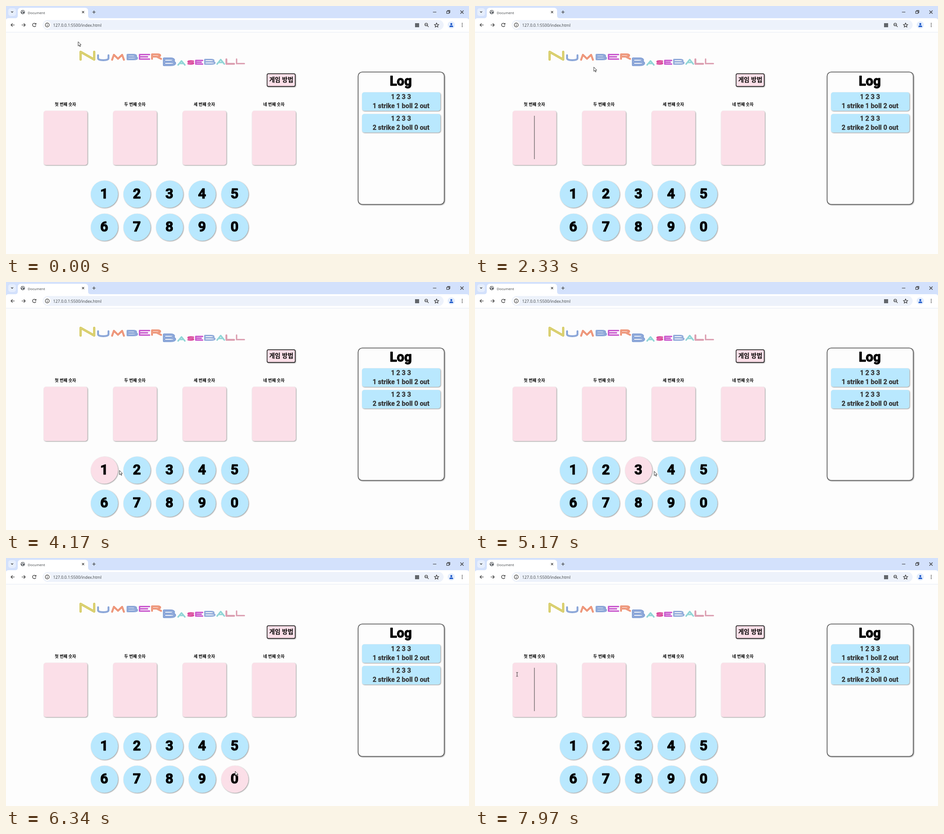
Recreate the animation shown at these times as an HTML page. Size 1021 by 549 pixels, loop 8000 ms.

```html
<!DOCTYPE html>
<html lang="ko">
<head>
<meta charset="utf-8">
<title>Document</title>
<style>
html, body { margin: 0; width: 100%; height: 100%; overflow: hidden; background: #fdfdfd; }
svg { display: block; width: 100vw; height: 100vh; }
text { font-family: Roboto, "Noto Sans CJK KR", sans-serif; text-anchor: middle; }
.ui { font-family: "Open Sans", "Noto Sans", sans-serif; text-anchor: start; fill: #3c4043; }
.round { stroke-linejoin: round; stroke: currentColor; fill: currentColor; }
.ko { font-family: "Noto Sans CJK KR", "Noto Sans CJK", sans-serif; font-weight: 900; }
.line { fill: none; stroke: #333; stroke-width: 1.2; }
.shade { filter: drop-shadow(1.5px 1.5px 1.2px rgba(0, 0, 0, .42)); }
.letter path { fill: none; stroke-linejoin: round; stroke-linecap: round; vector-effect: non-scaling-stroke; }
</style>
</head>
<body>
<svg id="stage" viewBox="0 0 1021 549" preserveAspectRatio="none">
  <!-- browser window -->
  <rect width="1021" height="30" fill="#d3e1fc"/>
  <rect x="5" y="5" width="17" height="17" rx="5" fill="#e6eefd"/>
  <path d="M20 27Q26 27 26 21V11Q26 4 33 4H174Q181 4 181 11V21Q181 27 187 27Z" fill="#fff"/>
  <path d="M0 32Q0 27 6 27H1015Q1021 27 1021 32V58H0Z" fill="#fff"/>
  <path d="M0 58H1021" stroke="#e3e9f3"/>
  <rect x="81" y="31" width="884" height="22" rx="11" fill="#edf2fb"/>
  <circle cx="91" cy="42" r="8" fill="#fff"/>
  <circle cx="37" cy="13.5" r="4.7" fill="#5f6368"/>
  <path d="M33.5 12Q36 12 36 14T38 17M36.5 9.5Q37 12 40.5 12" fill="none" stroke="#fff" stroke-width="1.3"/>
  <text class="ui" x="48" y="17.5" font-size="7.8">Document</text>
  <text class="ui" x="104" y="45.5" font-size="8.8">127.0.0.1:5500/index.html</text>
  <g class="line">
    <path d="M11.3 12L13.5 14.2L15.7 12M167.7 11.2L172.3 15.8M172.3 11.2L167.7 15.8M190.5 13.5H197.500M194 10V17"/>
    <path d="M941.500 13.500H949M972 11.500H977V16.500H972ZM974 11V9.800H978.800V14.700H977.500M1002 10L1009 17M1009 10L1002 17"/>
    <path d="M19 42H11M14.500 38.500L11 42L14.500 45.500M34.500 42H42.500M39 38.500L42.500 42L39 45.500"/>
    <path d="M65.300 39.500A3.800 3.800 0 1 0 66 43M66.300 37.800V40.500H63.300"/>
    <circle cx="91" cy="42" r="4.300"/><path d="M91 41.500V44.500M91 39.400V40.500"/>
    <circle cx="926.700" cy="41" r="3"/><path d="M929 43.300L932 46.300M925.200 41H928.200"/>
    <path d="M949.500 37.700L950.900 40.800L954.200 41.100L951.700 43.300L952.500 46.600L949.500 44.900L946.500 46.600L947.300 43.300L944.800 41.100L948.100 40.800Z"/>
  </g>
  <rect x="902" y="38" width="9" height="9" fill="#62666b"/>
  <circle cx="982" cy="42" r="8" fill="#e3edfd"/>
  <path d="M978 46.500V45Q978 43 982 43T986 45V46.500Z" fill="#1a57c8"/>
  <circle cx="982" cy="40" r="2.200" fill="#1a57c8"/>
  <g fill="#333"><circle cx="1006" cy="38.500" r="1"/><circle cx="1006" cy="42" r="1"/><circle cx="1006" cy="45.500" r="1"/></g>

  <!-- page -->
  <g id="title"></g>
  <rect class="shade" x="575.700" y="150" width="62" height="28" rx="3" fill="#fbdfe8" stroke="#111" stroke-width="1.400"/>
  <text class="ko" x="607" y="168" font-size="13.400">게임 방법</text>
  <rect class="shade" x="776.500" y="146.300" width="190" height="293" rx="9" fill="#fdfdfd" stroke="#555" stroke-width="1.600"/>
  <text class="round" x="870.500" y="175.500" font-size="29" font-weight="700" stroke-width="1.300">Log</text>
  <g id="page"></g>
  <path id="caret" d="M131 243V339" stroke="#3a3a3a"/>
  <path id="arrow" d="M0 0V9.500L2.200 7.500L3.800 11L5.200 10.400L3.700 7H6.600Z" fill="#fff" stroke="#222" stroke-width=".9"/>
  <path id="beam" d="M-2 -4.500Q0 -4.500 0 -3.500Q0 -4.500 2 -4.500M0 -3.500V3.500M-2 4.500Q0 4.500 0 3.500Q0 4.500 2 4.500" fill="none" stroke="#333"/>
</svg>
<script>
const LOOP = 8000, BLUE = '#b9e8fe', PINK = '#fbdfe8';
const $ = id => document.getElementById(id);

function add(parent, tag, attrs, text = '') {
  const el = document.createElementNS('http://www.w3.org/2000/svg', tag);
  for (const key in attrs) el.setAttribute(key, attrs[key]);
  el.textContent = text;
  return parent.appendChild(el);
}

// Title lettering: each glyph is drawn in a 10 by 10 box.
const glyphs = {
  N: 'M0 10V0L10 10V0',
  U: 'M0 0V6Q0 10 5 10T10 6V0',
  M: 'M0 10L1.5 0L5 8L8.5 0L10 10',
  B: 'M0 0V10H6Q10 10 10 7.4T5 5H0M0 0H6Q9 0 9 2.5T5 5',
  E: 'M10 0H0V10H10M0 5H8',
  R: 'M0 10V0H6Q9 0 9 2.5T5 5H0M5 5L10 10',
  A: 'M0 10L5 0L10 10M2 6.5H8',
  S: 'M10 1Q8 0 5 0Q0 0 0 2.5T5 5T10 7.5T5 10Q2 10 0 9',
  L: 'M0 0V10H10'
};
const yellow = '#d6cb62', blue = '#7f9dd4', orange = '#ec8b6c', purple = '#c13fc6',
      teal = '#7fcfd0', rose = '#d6338f', dusty = '#d894a8';
const letters = [
  ['N', 162, 99, 35, 22, yellow], ['U', 201, 107, 27, 15, blue], ['M', 232, 106, 30, 15, orange],
  ['B', 266, 106, 25, 14, blue], ['E', 293, 106, 25, 13, purple], ['R', 320, 105, 24, 14, orange],
  ['B', 346, 114, 29, 19, blue], ['A', 378, 120, 18, 12, teal], ['S', 400, 120, 15, 10, rose],
  ['E', 417, 119, 18, 11, purple], ['B', 437, 117, 25, 13, blue], ['A', 464, 117, 19, 13, teal],
  ['L', 484, 116, 21, 14, dusty], ['L', 507, 116, 20, 13, dusty]
];
for (const [char, x, y, w, h, color] of letters) {
  const pen = h > 18 ? 5 : h > 13 ? 4 : 3;
  const g = add($('title'), 'g', {
    class: 'letter',
    transform: `translate(${x + pen / 2} ${y + pen / 2}) scale(${(w - pen) / 10} ${(h - pen) / 10})`
  });
  add(g, 'path', { d: glyphs[char], stroke: color, 'stroke-width': pen });
  add(g, 'path', { d: glyphs[char], stroke: '#fff', 'stroke-width': 1, opacity: .3 });
}

// Input boxes
const page = $('page');
['첫', '두', '세', '네'].forEach((word, i) => {
  const x = 83 + i * 153.2;
  add(page, 'text', { class: 'ko', x: x + 48, y: 221, 'font-size': 9.1 }, word + ' 번째 숫자');
  add(page, 'rect', { class: 'shade', x, y: 232, width: 96.5, height: 120, rx: 5, fill: PINK });
});

// Log entries
['1 strike 1 boll 2 out', '2 strike 2 boll 0 out'].forEach((result, i) => {
  const y = 191 + i * 48;
  add(page, 'rect', { class: 'shade', x: 785, y, width: 173, height: 41, rx: 5, fill: BLUE });
  ['1 2 3 3', result].forEach((line, row) => add(page, 'text', {
    class: 'round', color: '#333', x: 871, y: y + 15 + row * 19.5,
    'font-size': 14.5, 'font-weight': 700, 'stroke-width': .3
  }, line));
});

// Number keys
const keys = [...'1234567890'].map((digit, i) => {
  const x = 217 + i % 5 * 71.9, y = i < 5 ? 416.5 : 489.7;
  const disc = add(page, 'circle', { class: 'shade', cx: x, cy: y, r: 30 });
  add(page, 'text', {
    class: 'round', x: x - .5, y: y + 9.5, 'font-size': 30.5, 'font-weight': 700, 'stroke-width': 1.2
  }, digit);
  return { x, y, disc };
});

// Pointer route: time, x, y
const route = [
  [0, 159, 79], [500, 196, 86], [1000, 238, 96], [1650, 257, 114], [2330, 262, 135],
  [2800, 229, 252], [3270, 195, 374], [3800, 212, 410], [4300, 266, 418], [4750, 327, 419],
  [5170, 395, 419], [5500, 448, 422], [5850, 500, 432], [6340, 505.5, 472], [6600, 478, 490],
  [6900, 412, 494], [7200, 315, 491], [7450, 222, 474], [7700, 140, 365], [7970, 93, 258], [8000, 92, 257]
];

function pointer(t) {
  let i = 0;
  while (i < route.length - 2 && t >= route[i + 1][0]) i++;
  const at = n => route[Math.max(0, Math.min(route.length - 1, n))];
  const [p, a, b, q] = [at(i - 1), at(i), at(i + 1), at(i + 2)];
  const span = b[0] - a[0], u = (t - a[0]) / span;
  return [1, 2].map(k => {
    const m = (b[k] - p[k]) / (b[0] - p[0]) * span;
    const n = (q[k] - a[k]) / (q[0] - a[0]) * span;
    const d = b[k] - a[k];
    return a[k] + u * (m + u * (3 * d - 2 * m - n + u * (m + n - 2 * d)));
  });
}

function draw(now) {
  const t = now % LOOP;
  const [x, y] = pointer(t);
  // Hover follows the pointer with a slight delay.
  const [hx, hy] = pointer(Math.max(0, t - 70));
  for (const key of keys)
    key.disc.setAttribute('fill', Math.hypot(hx - key.x, hy - key.y) < 30 ? PINK : BLUE);
  const typing = y > 232 && y < 352 && x > 83 && x < 640 && (x - 83) % 153.2 < 96.5;
  const place = `translate(${x} ${y})`;
  $('arrow').setAttribute('transform', place);
  $('beam').setAttribute('transform', place);
  $('arrow').setAttribute('visibility', typing ? 'hidden' : 'visible');
  $('beam').setAttribute('visibility', typing ? 'visible' : 'hidden');
  $('caret').setAttribute('visibility', (t + 910) % 1060 < 530 ? 'visible' : 'hidden');
}

const start = performance.now();
(function tick() {
  draw(performance.now() - start);
  requestAnimationFrame(tick);
})();
</script>
</body>
</html>
```
